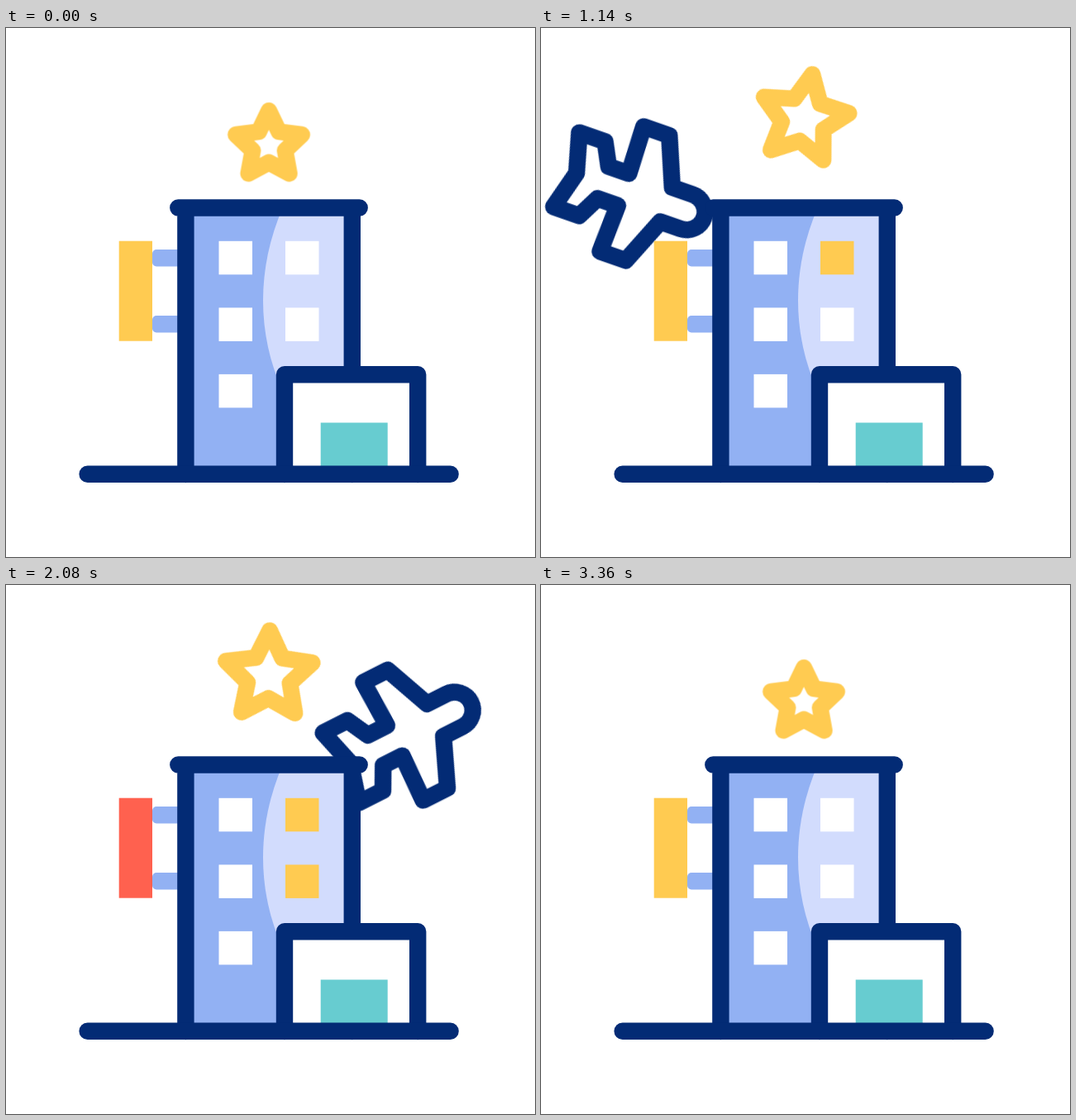
An HTML page without scripts for the animation above (3520 ms loop, 640 px wide and 640 px high).

```html
<!DOCTYPE html>
<html lang="en">
<head>
<meta charset="utf-8">
<title>Hotel</title>
<style>
  :root { --navy: #032b75; --blue: #92b1f3; --pale: #d2dcfd; --gold: #ffcb51; --red: #ff614f; --teal: #67ccd0; }
  html, body { margin: 0; width: 100%; height: 100%; overflow: hidden; background: #fff; }
  svg { display: block; width: 100vw; height: 100vh; }

  .line { fill: none; stroke: var(--navy); stroke-width: 20.4; stroke-linecap: round; stroke-linejoin: round; }
  .solid { fill: #fff; }
  .win { fill: #fff; }
  .anim { animation: 3520ms linear infinite; }

  /* plane: x, y and heading move separately */
  .fly-x { animation-name: fly-x; }
  .fly-y { animation-name: fly-y; }
  .turn { animation-name: turn; }
  @keyframes fly-x {
    0%, 15.909% { transform: translateX(-139px); }
    22.727% { transform: translateX(-26px); }
    32.386% { transform: translateX(128.5px); }
    42.045% { transform: translateX(264.5px); }
    59.091% { transform: translateX(497.5px); }
    69.318% { transform: translateX(634.6px); }
    82.386%, 100% { transform: translateX(814px); }
  }
  @keyframes fly-y {
    0%, 15.909% { transform: translateY(7px); }
    22.727% { transform: translateY(110px); animation-timing-function: cubic-bezier(.333, .44, .667, .773); }
    32.386% { transform: translateY(205.5px); animation-timing-function: cubic-bezier(.333, .627, .667, .918); }
    42.045% { transform: translateY(240px); animation-timing-function: cubic-bezier(.333, -.076, .667, .267); }
    59.091% { transform: translateY(174.5px); animation-timing-function: cubic-bezier(.333, .25, .667, .585); }
    69.318% { transform: translateY(59.5px); }
    82.386%, 100% { transform: translateY(-170px); }
  }
  @keyframes turn {
    0%, 15.909% { transform: rotate(53deg); }
    22.727% { transform: rotate(39deg); }
    32.386% { transform: rotate(19.3deg); }
    42.045% { transform: rotate(2.5deg); }
    59.091% { transform: rotate(-26.8deg); }
    69.318% { transform: rotate(-43deg); }
    82.386%, 100% { transform: rotate(-63deg); }
  }

  /* star: hop with growth, two full spins */
  .hop { animation-name: hop; }
  .spin { animation-name: spin; }
  .star { fill: none; stroke: var(--gold); stroke-width: 20; stroke-linejoin: round; vector-effect: non-scaling-stroke; }
  @keyframes hop {
    0%, 5.682% { transform: translate(318px, 142px) scale(.764); animation-timing-function: ease-in-out; }
    13.636% { transform: translate(318px, 82px); animation-timing-function: ease-in-out; }
    21.023%, 81.25% { transform: translate(318px, 110px); animation-timing-function: ease-in-out; }
    88.068% { transform: translate(318px, 84px); animation-timing-function: ease-in-out; }
    95.455%, 100% { transform: translate(318px, 142px) scale(.764); }
  }
  @keyframes spin {
    0%, 5.682% { transform: rotate(0deg); animation-timing-function: cubic-bezier(.333, 0, .667, .35); }
    22.727% { transform: rotate(61.5deg); animation-timing-function: cubic-bezier(.333, .244, .667, .616); }
    32.386% { transform: rotate(154.5deg); animation-timing-function: cubic-bezier(.333, .309, .667, .642); }
    42.045% { transform: rotate(270.2deg); animation-timing-function: cubic-bezier(.333, .311, .667, .663); }
    59.091% { transform: rotate(504.7deg); animation-timing-function: cubic-bezier(.333, .355, .667, .704); }
    69.318% { transform: rotate(638.4deg); animation-timing-function: cubic-bezier(.333, .7, .667, 1); }
    84.091%, 100% { transform: rotate(720deg); }
  }

  /* hard colour switches */
  .sign, .lit { animation-timing-function: step-end; }
  .sign { animation-name: blink; }
  .one { animation-name: one; }
  .two { animation-name: two; }
  .three { animation-name: three; }
  @keyframes blink {
    0%, 13.352%, 28.693%, 44.034%, 59.375%, 74.716%, 90.057%, 100% { fill: var(--gold); }
    5.682%, 21.023%, 36.364%, 51.705%, 67.045%, 82.386% { fill: var(--red); }
  }
  @keyframes one { 0%, 84.1%, 100% { fill: #fff; } 18.2% { fill: var(--gold); } }
  @keyframes two { 0%, 84.1%, 100% { fill: #fff; } 47.7% { fill: var(--gold); } }
  @keyframes three { 0%, 84.1%, 100% { fill: #fff; } 65.3% { fill: var(--gold); } }
</style>
</head>
<body>
<svg viewBox="0 0 640 640">
  <g class="anim fly-x"><g class="anim fly-y"><g class="anim turn">
    <path class="line solid" d="M-104-47.5H-71L-57-20.5H-31L-33-80H0L24-22H50A22.3 22 0 0 1 50 22H24L0 80H-33L-31 20.5H-57L-71 47.5H-104L-91 0Z"/>
  </g></g></g>

  <rect x="177" y="268" width="38" height="20.5" rx="5" fill="var(--blue)"/>
  <rect x="177" y="348" width="38" height="20.5" rx="5" fill="var(--blue)"/>
  <rect class="anim sign" x="136.7" y="257.7" width="40.3" height="121" fill="var(--gold)"/>

  <rect x="217" y="217" width="202" height="323" fill="var(--blue)"/>
  <path d="M335 217C303 290 303 370 335 440H419V217Z" fill="var(--pale)"/>
  <g class="wins">
    <rect class="win" x="257.5" y="257.8" width="40.5" height="40.5"/>
    <rect class="win" x="257.5" y="338.4" width="40.5" height="40.5"/>
    <rect class="win anim lit three" x="257.5" y="418.9" width="40.5" height="40.5"/>
    <rect class="win anim lit one" x="338" y="257.8" width="40.5" height="40.5"/>
    <rect class="win anim lit two" x="338" y="338.4" width="40.5" height="40.5"/>
  </g>
  <path class="line" d="M217.4 540V217.5M418.8 540V217.5M208.3 217.5H427.7"/>
  <path class="line solid" d="M337 540V419.2H498.2V540"/>
  <rect x="380.7" y="477.5" width="81" height="55" fill="var(--teal)"/>
  <path class="line" d="M98.6 539.8H537.6"/>

  <g class="anim hop"><g class="anim spin">
    <path class="star" d="M0-55L15.9-21.8L52.3-17L25.7 8.3L32.3 44.5L0 27L-32.3 44.5L-25.7 8.3L-52.3-17L-15.9-21.8Z"/>
  </g></g>
</svg>
</body>
</html>
```
